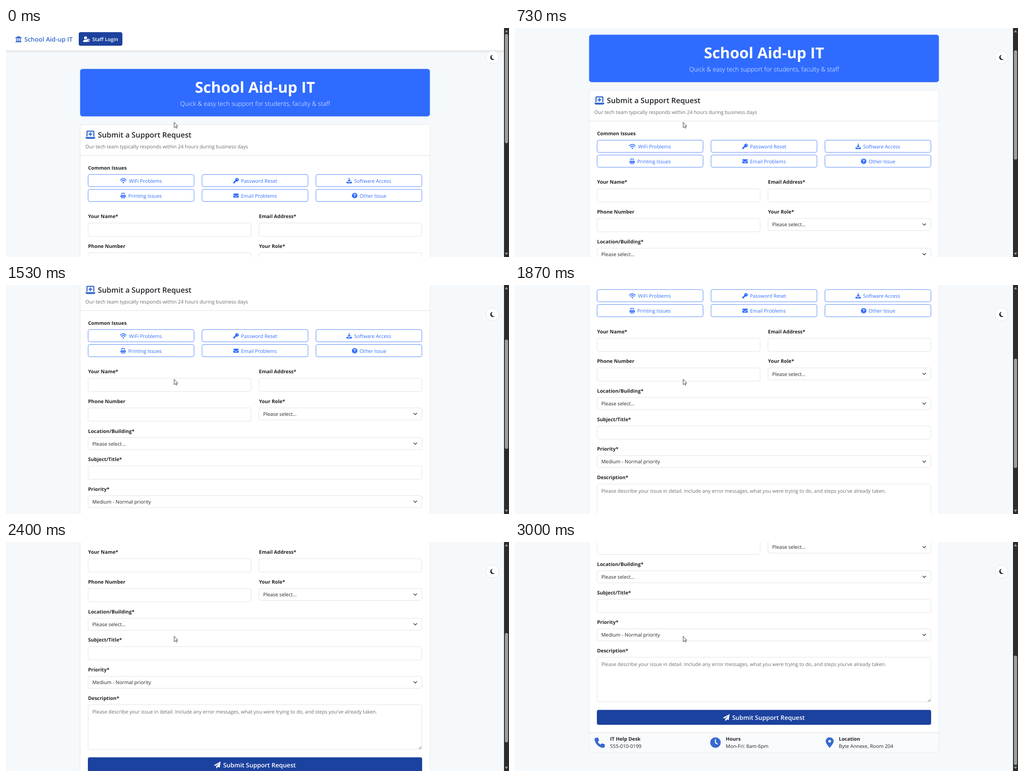
An HTML page that plays this animation: 1106 px wide and 506 px high, repeating every 4140 ms.

```html
<!DOCTYPE html>
<html lang="en">
<head>
<meta charset="utf-8">
<title>Support request form</title>
<style>
  html, body { margin: 0; width: 100%; height: 100%; overflow: hidden; background: #f5f9fc; }
  svg { display: block; width: 1106px; height: 506px; }
  text { font-family: "Open Sans", "Noto Sans", sans-serif; text-rendering: geometricPrecision; white-space: pre; }
</style>
</head>
<body>
<svg id="stage" viewBox="0 0 1106 506"></svg>
<script>
const BLUE = '#2f6bff', NAVY = '#1c429f', ACCENT = '#3669d0';
const INK = '#212529', GREY = '#666d74', LINE = '#dee2e6';
const BODY = 10.87;

// Icons live in a 16 x 16 box and take their colour from the group.
const line = (d, w, color = 'currentColor') =>
  `<path d="${d}" fill="none" stroke="${color}" stroke-width="${w}" stroke-linecap="round" stroke-linejoin="round"/>`;
const solid = d => `<path d="${d}" fill-rule="evenodd"/>`;
const icons = {
  bank: solid('M8 0L16 4V6H0V4ZM2 7H4.3V12H2ZM6.9 7H9.1V12H6.9ZM11.7 7H14V12H11.7ZM1 12.6H15V14L16 16H0L1 14Z'),
  staff: '<circle cx="5.6" cy="4.6" r="3.7"/>' +
    solid('M4 9.4H7.2Q8.6 9.4 9 10Q9 13 11 15H.8Q-.6 15-.6 13.8Q-.6 9.8 4 9.4Z' +
      'M12.7 6.6L16.6 8.2Q16.6 13.2 12.7 15Q8.9 13.2 8.9 8.2ZM12.7 8.2V13.4Q15 12 15.2 9.2Z'),
  laptop: solid('M3.2 1.2H12.8Q14.4 1.2 14.4 2.8V10.6H12.6V3H3.4V10.6H1.6V2.8Q1.6 1.2 3.2 1.2Z' +
    'M0 11.6H16Q16 14.6 13.6 14.6H2.4Q0 14.6 0 11.6ZM7.1 4H8.9V6H10.9V7.8H8.9V9.8H7.1V7.8H5.1V6H7.1Z'),
  wifi: line('M1 6.4Q8-.2 15 6.4M3.7 9.4Q8 5.4 12.3 9.4', 1.9) + '<circle cx="8" cy="12.7" r="1.7"/>',
  print: solid('M3.6 0H10.8L13 2.2V6H11V3L10 2H5V6H3V.6ZM2 7H14Q16 7 16 9V13H14V10.6H2V13H0V9Q0 7 2 7Z' +
    'M3 11.4H13V16H3ZM5 13.2V14.4H11V13.2Z'),
  key: solid('M10.8 0A5.2 5.2 0 1 1 9.2 10.1L8 11.4H6.2V13.2H4.4V16H0V12.2L5.9 6.6A5.2 5.2 0 0 1 10.8 0Z' +
    'M12 2.7A1.3 1.3 0 1 0 12 5.3A1.3 1.3 0 1 0 12 2.7Z'),
  mail: solid('M1.5 2.2H14.5Q16 2.4 16 3.8Q16 4.6 15.3 5.1L8 10.3L.7 5.1Q0 4.6 0 3.8Q0 2.4 1.5 2.2Z' +
    'M0 6.2L8 12L16 6.2V12Q16 14 14 14H2Q0 14 0 12Z'),
  download: solid('M6.8 0H9.2V6.4H13L8 11.6L3 6.4H6.8Z' +
    'M1.5 10.8H4.2L8 14L11.8 10.8H14.5Q16 10.8 16 12.3V14.5Q16 16 14.5 16H1.5Q0 16 0 14.5V12.3Q0 10.8 1.5 10.8Z'),
  help: '<circle cx="8" cy="8" r="8"/>' + line('M5.7 6Q6 4 8 4Q10.3 4 10.3 6Q10.3 7.2 8 8.3V9.1', 1.7, '#fff') +
    '<circle cx="8" cy="12" r="1.1" fill="#fff"/>',
  plane: solid('M16 0L13.6 14.2L9.3 12.4L6.6 16L5.6 15.6V11.6L13 3.2L4.2 10.4L0 8.6Z'),
  phone: solid('M4.2.2L5.4.6L6.8 4.4L6.3 5.6L4.8 6.9Q6.2 9.8 9.1 11.2L10.4 9.7L11.6 9.2L15.4 10.6L15.9 11.8' +
    'L15 15.1L14 16Q8.4 16 4.2 11.8Q0 7.6 0 2L.9 1Z'),
  clock: '<circle cx="8" cy="8" r="8"/>' + line('M8 3.6V8.2L10.9 10.2', 1.5, '#fff'),
  pin: solid('M8 0A6 6 0 0 1 14 6Q14 9.2 8 16Q2 9.2 2 6A6 6 0 0 1 8 0ZM8 4A2 2 0 1 0 8 8A2 2 0 1 0 8 4Z'),
  moon: solid('M9.3 1.2A6.9 6.9 0 1 0 14.6 12.2A5.9 5.9 0 0 1 9.3 1.2Z')
};

const icon = (name, x, cy, size, color) =>
  `<g transform="translate(${x} ${cy - size / 2}) scale(${size / 16})" fill="${color}" color="${color}">${icons[name]}</g>`;
const text = (s, x, y, { size = BODY, weight = 400, color = INK, anchor = 'start' } = {}) =>
  `<text x="${x}" y="${y}" font-size="${size}" font-weight="${weight}" fill="${color}" text-anchor="${anchor}">${s}</text>`;
const box = (x, y, w, h, { r = 4, fill = '#fff', stroke = LINE } = {}) =>
  `<rect x="${x}" y="${y}" width="${w}" height="${h}" rx="${r}" fill="${fill}" stroke="${stroke}"/>`;
const bold = (s, x, y) => text(s, x, y, { weight: 700 });

const issue = (name, label, x, y, iconX, textX, size = 12) =>
  box(x, y, 233, 27, { stroke: '#5286f6' }) + icon(name, iconX, y + 13.7, size, BLUE) +
  text(label, textX, y + 18, { color: BLUE });
const field = (label, x, y, w) => bold(label, x, y - 10.7) + box(x, y, w, 29.4);
const select = (label, value, x, y, w) =>
  bold(label, x, y - 10.7) + box(x, y, w, 26.6) + text(value, x + 9.3, y + 17.4) +
  line(`M${x + w - 18} ${y + 11.6}l3.4 3.4l3.4-3.4`, 1.4, '#343a40');
const contact = (name, x, size, title, detail, textX) =>
  icon(name, x, 941.8, size, ACCENT) + bold(title, textX, 937.6) + text(detail, textX, 953.6);

const navbar =
  '<rect y="49" width="1095" height="7" fill="url(#shade)"/><rect width="1095" height="49.3" fill="#fff"/>' +
  icon('bank', 20.7, 24.6, 13.6, ACCENT) +
  text('School Aid-up IT', 40.2, 30, { size: 13.8, weight: 600, color: ACCENT }) +
  box(160.5, 9.8, 94.8, 28.9, { r: 3, fill: NAVY, stroke: '#183a8c' }) +
  icon('staff', 170, 24.8, 14, '#fff') +
  text('Staff Login', 189.8, 28.8, { size: 11.05, weight: 600, color: '#fff' });

const banner =
  box(163.3, 90.9, 768.4, 104, { r: 5, fill: BLUE, stroke: '#3d74f6' }) +
  text('School Aid-up IT', 547.5, 143, { size: 33.3, weight: 700, color: '#fff', anchor: 'middle' }) +
  text('Quick &amp; easy tech support for students, faculty &amp; staff', 547.8, 172,
    { size: 13.7, weight: 300, color: '#fff', anchor: 'middle' });

const card =
  box(163, 213.5, 769.3, 750, { r: 5, stroke: '#e2e6ea' }) +
  '<path d="M163.5 919.7H931.8V958.5Q931.8 963 927.3 963H168Q163.5 963 163.5 958.5Z" fill="#f9fafc"/>' +
  '<path d="M163 281.5H932M163 919.6H932" stroke="#dcdfe2"/>' +
  icon('laptop', 174.8, 236, 21.6, ACCENT) +
  text('Submit a Support Request', 202, 242, { size: 16.35, weight: 600 }) +
  text('Our tech team typically responds within 24 hours during business days', 174.6, 265.5, { color: GREY });

const form =
  bold('Common Issues', 180.4, 313.2) +
  issue('wifi', 'WiFi Problems', 180.5, 323.6, 250.8, 270.6, 14.4) +
  issue('key', 'Password Reset', 431, 323.6, 499.8, 516.8) +
  issue('download', 'Software Access', 681.5, 323.6, 748.6, 765.6) +
  issue('print', 'Printing Issues', 180.5, 356.5, 251.6, 268.8) +
  issue('mail', 'Email Problems', 431, 356.5, 499.8, 516.8) +
  issue('help', 'Other Issue', 681.5, 356.5, 760.6, 777.6) +
  field('Your Name*', 180.5, 430.9, 358.5) +
  field('Email Address*', 556.3, 430.9, 358.2) +
  field('Phone Number', 180.5, 496.6, 358.5) +
  select('Your Role*', 'Please select...', 556.3, 496.6, 358.2) +
  select('Location/Building*', 'Please select...', 180.5, 562.2, 734) +
  field('Subject/Title*', 180.5, 624.9, 734) +
  select('Priority*', 'Medium - Normal priority', 180.5, 690.5, 734) +
  bold('Description*', 180.5, 742.4) +
  box(180.5, 753.2, 734, 98.8) +
  text("Please describe your issue in detail. Include any error messages, what you were trying to do, and steps you've already taken.",
    189.8, 772.6, { color: GREY }) +
  line('M908 851l5-5M911 851.3l2-2', 1, '#555') +
  box(180.5, 870, 734, 32, { r: 3, fill: NAVY, stroke: NAVY }) +
  icon('plane', 457, 886.4, 15, '#fff') +
  text('Submit Support Request', 477.4, 891.4, { size: 13.6, weight: 600, color: '#fff' });

const contacts =
  contact('phone', 175, 23, 'IT Help Desk', '555-010-0199', 209) +
  contact('clock', 429.3, 23, 'Hours', 'Mon-Fri: 8am-6pm', 463.6) +
  contact('pin', 680.2, 23.4, 'Location', 'Byte Annexe, Room 204', 712);

const overlay =
  '<circle cx="1069.8" cy="65" r="14.2" fill="#fff" stroke="#e1e5ea"/>' + icon('moon', 1063, 65, 13, '#212b3a') +
  '<rect x="1095" width="11" height="506" fill="#2c2c2c"/>' +
  '<path d="M1097 9.5L1100.5 4.5L1104 9.5ZM1097 496.5L1100.5 501.5L1104 496.5Z" fill="#9f9f9f"/>' +
  '<rect id="thumb" x="1097" y="13" width="7" height="241.6" rx="3.5" fill="#9f9f9f"/>' +
  '<path d="M369.8 208.2V220.3L372.5 217.8L374.2 221.4L376.1 220.5L374.5 217H377.8Z" fill="#fff" stroke="#222" stroke-width=".9"/>';

document.getElementById('stage').innerHTML =
  '<defs><linearGradient id="shade" x2="0" y2="1"><stop stop-opacity=".09"/><stop offset="1" stop-opacity="0"/></linearGradient></defs>' +
  `<rect width="1106" height="506" fill="#f5f9fc"/><g id="page">${navbar + banner + card + form + contacts}</g>` + overlay;

// Scroll position at ticks of 1/15 s, with eased stops at the pauses.
const LOOP = 4140, RATE = 15;
const path = [[4, 0], [8, 38], [15, 136], [19, 213], [22, 213], [23, 225], [28, 313.5], [36, 393.8], [38, 393.8], [45, 498.6]];
const slope = i => (path[i + 1][1] - path[i][1]) / (path[i + 1][0] - path[i][0]);
const tangents = path.map((_, i) => {
  if (i === 0 || i === path.length - 1) return 0;
  const a = slope(i - 1), b = slope(i);
  return a * b > 0 ? 2 * a * b / (a + b) : 0;
});

function scrollAt(tick) {
  const last = path.length - 1;
  if (tick <= path[0][0]) return 0;
  if (tick >= path[last][0]) return path[last][1];
  const i = path.findIndex(p => p[0] > tick) - 1;
  const [t0, y0] = path[i], [t1, y1] = path[i + 1];
  const h = t1 - t0, u = (tick - t0) / h, v = 1 - u;
  return y0 * v * v * (1 + 2 * u) + y1 * u * u * (3 - 2 * u) +
    h * u * v * (tangents[i] * v - tangents[i + 1] * u);
}

const page = document.getElementById('page'), thumb = document.getElementById('thumb');
function draw() {
  const time = performance.now() % LOOP;
  const y = scrollAt(Math.floor((time + 5) * RATE / 1000));
  page.setAttribute('transform', `translate(0 ${-y.toFixed(2)})`);
  thumb.setAttribute('y', 13 + y * 0.4775);
  requestAnimationFrame(draw);
}
draw();
</script>
</body>
</html>
```
